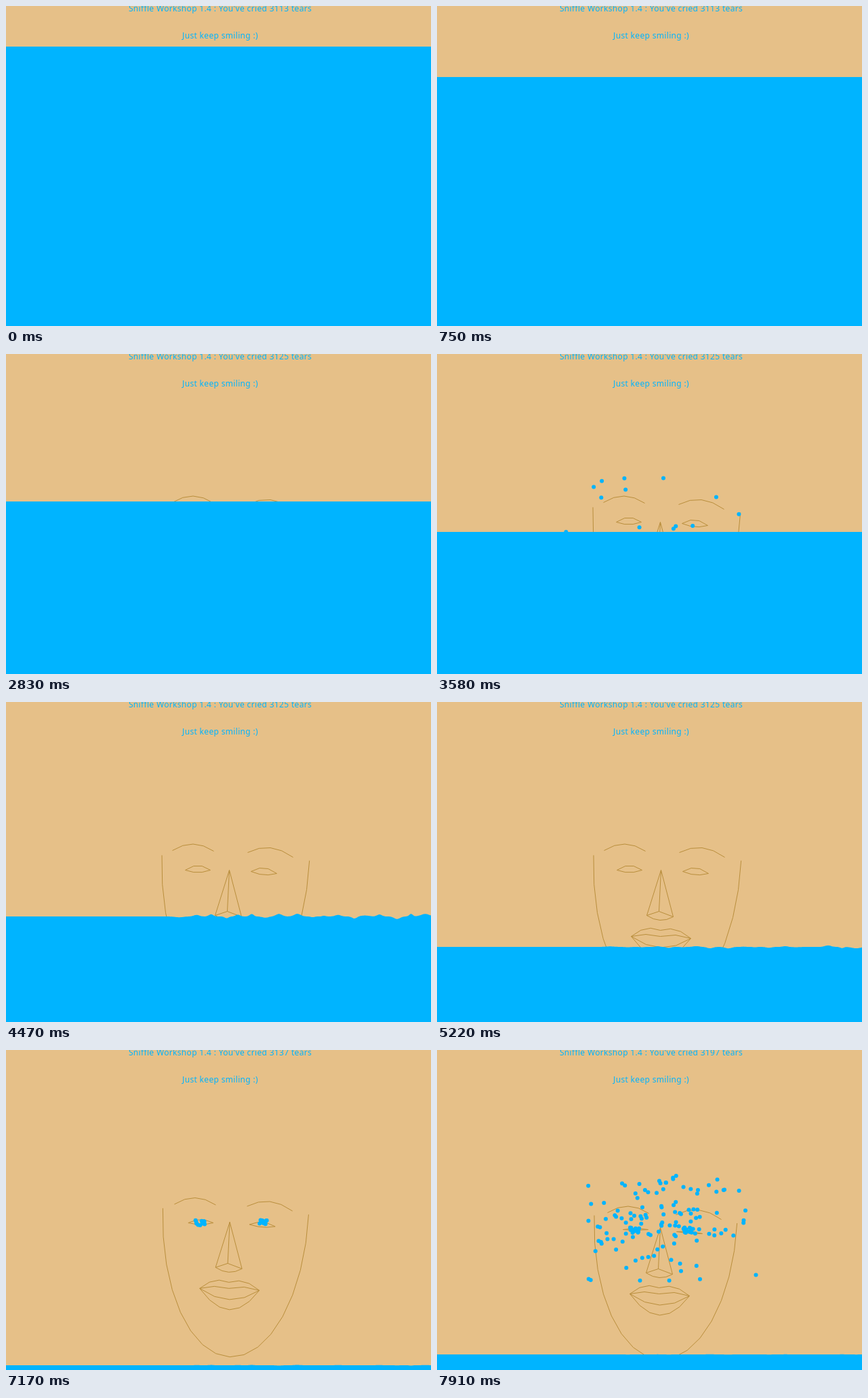
Animation, 627 px wide and 473 px high, one loop 8 s. Source, as an HTML page with a canvas:

```html
<!DOCTYPE html>
<html lang="en">
<head>
<meta charset="utf-8">
<title>Tears</title>
<style>
html, body { margin: 0; height: 100%; overflow: hidden; background: #e6c088; }
canvas { display: block; }
</style>
</head>
<body>
<canvas width="627" height="473"></canvas>
<script>
const canvas = document.querySelector('canvas');
const ctx = canvas.getContext('2d');
const W = 627, H = 473, LOOP = 8000, STEP = 149.25;
const SKIN = '#e6c088', WATER = '#00b4ff', LINE = '#b98e3c';
const FIRST_BURST = 19, SOBBING = 48, TEARS_PER_EYE = 12, GRAVITY = 8;

const clamp01 = v => Math.min(1, Math.max(0, v));
const bowAt = step => clamp01((step - 45) / 8);

function randomizer(seed) {
  return () => {
    seed = seed + 0x6d2b79f5 | 0;
    let t = Math.imul(seed ^ seed >>> 15, 1 | seed);
    t = t + Math.imul(t ^ t >>> 7, 61 | t) ^ t;
    return ((t ^ t >>> 14) >>> 0) / 4294967296;
  };
}

// A polyline of n segments along a parabola that sags by h between two points.
function bend(x0, y0, x1, y1, h = 0, n = 1) {
  for (let k = 0; k <= n; k++) {
    const t = k / n;
    const x = x0 + (x1 - x0) * t, y = y0 + (y1 - y0) * t + h * 4 * t * (1 - t);
    k ? ctx.lineTo(x, y) : ctx.moveTo(x, y);
  }
}

function shifted(dx, dy, path) {
  ctx.save();
  ctx.translate(dx, dy);
  path();
  ctx.restore();
}

function drawEye(x0, y0, x1, y1, open) {
  bend(x0, y0, x1, y1, -6.75 * open, 3);
  bend(x0, y0, x1, y1, 3.5 * open, 3);
}

function drawNose() {
  bend(330, 248, 309, 315);
  bend(330, 248, 348, 317);
  bend(330, 248, 327, 309);
  bend(309, 315, 327, 309);
  bend(327, 309, 348, 317);
  bend(309, 315, 348, 317, 6, 4);
}

function drawMouth() {
  bend(286, 346, 329, 337, -7, 3);
  bend(329, 337, 374, 349, -7, 3);
  bend(286, 346, 329, 346, -3, 2);
  bend(329, 346, 374, 349, -3.5, 2);
  bend(286, 346, 374, 349, 15, 4);
  bend(286, 346, 374, 349, 30, 6);
}

// The jaw is the lower half of an ellipse that leans as the head bows.
function drawJaw(bow) {
  const segments = 16;
  for (let k = 0; k <= segments; k++) {
    const a = 3.106 * k / segments, depth = Math.sin(a);
    const side = (1 - Math.cos(a)) / 2;
    const x = 339.5 - 7 * depth - 109 * Math.cos(a) + (1 - 7 * side) * bow;
    const y = 226 + 224 * depth + (18 + 4 * side - 13 * depth) * bow;
    k ? ctx.lineTo(x, y) : ctx.moveTo(x, y);
  }
}

function drawFace(step) {
  const bow = bowAt(step), open = 1 - 0.75 * bow;
  const driftX = -clamp01((35 - step) / 5);
  const driftY = clamp01((step - 35) / 8) * (1 - bow);
  ctx.strokeStyle = LINE;
  ctx.lineWidth = 1;
  ctx.beginPath();
  shifted(driftX + 0.5, driftY + 0.5, () => {
    shifted(5 * bow, 21 * bow, () => bend(246, 219, 307, 220, -10, 4));
    shifted(-5 * bow, 21 * bow, () => bend(357, 222, 424, 229, -10.5, 4));
    shifted(9 * bow, 17 * bow, () => drawEye(265, 248, 302, 248, open));
    shifted(-9 * bow, 18 * bow, () => drawEye(362, 250, 400, 253, open));
    shifted(-1 * bow, 14 * bow, drawNose);
    shifted(-2 * bow, 14 * bow, drawMouth);
    drawJaw(bow);
  });
  ctx.stroke();
}

function burstsUntil(step) {
  const bursts = step >= FIRST_BURST ? [FIRST_BURST] : [];
  for (let s = SOBBING; s <= step; s++) bursts.push(s);
  return bursts;
}

function drawTears(step, bursts) {
  ctx.fillStyle = WATER;
  for (const start of bursts) {
    const random = randomizer(start);
    const spread = size => (random() - 0.5) * size;
    const age = step - start, bow = bowAt(start);
    for (let k = 0; k < TEARS_PER_EYE * 2; k++) {
      const side = k % 2 ? 1 : -1;
      const x = 332 + side * (48 - 8 * bow) + spread(16) + spread(40) * age;
      const y = 249 + 17 * bow + spread(8) - 36 * random() * age + GRAVITY * age * age / 2;
      ctx.beginPath();
      ctx.arc(x, y, 3, 0, 2 * Math.PI);
      ctx.fill();
    }
  }
}

const randomRipple = randomizer(7);
const ripples = Array.from({ length: 18 }, (_, k) => ({
  x: 255 + 21 * k + 10 * randomRipple(),
  height: (k % 3 ? -1 : 1) * (1 + 3 * randomRipple()),
  width: 3 + 6 * randomRipple(),
  pace: 0.3 + 0.4 * randomRipple()
}));

// Ripples rise when the first tears land, then fade.
function surface(x, step) {
  const since = step - 30;
  const strength = clamp01((since + 6) / 4) * Math.exp(-Math.max(0, since) / 9);
  return strength * ripples.reduce((sum, r) =>
    sum + r.height * Math.cos(since * r.pace) * Math.exp(-(((x - r.x) / r.width) ** 2)), 0);
}

function drawWater(step, cried) {
  const level = Math.round(59.6 + 8.985 * step - 1.025 * cried);
  ctx.fillStyle = WATER;
  ctx.beginPath();
  ctx.moveTo(0, H);
  for (let x = 0; x <= W; x++) ctx.lineTo(x, level + surface(x, step));
  ctx.lineTo(W, H);
  ctx.fill();
}

function drawText(cried) {
  ctx.fillStyle = WATER;
  ctx.font = '12px "Noto Sans", sans-serif';
  ctx.letterSpacing = '0.33px';
  ctx.textAlign = 'center';
  ctx.fillText(`Sniffle Workshop 1.4 : You've cried ${3113 + cried} tears`, 316, 8);
  ctx.fillText('Just keep smiling :)', 316, 48);
}

function draw(now) {
  const step = Math.floor((now % LOOP + 12) / STEP);
  const bursts = burstsUntil(step);
  const cried = bursts.length * TEARS_PER_EYE;
  ctx.fillStyle = SKIN;
  ctx.fillRect(0, 0, W, H);
  drawFace(step);
  drawTears(step, bursts);
  drawWater(step, cried);
  drawText(cried);
}

const begin = performance.now();
function tick() {
  draw(performance.now() - begin);
  requestAnimationFrame(tick);
}
tick();
</script>
</body>
</html>
```
